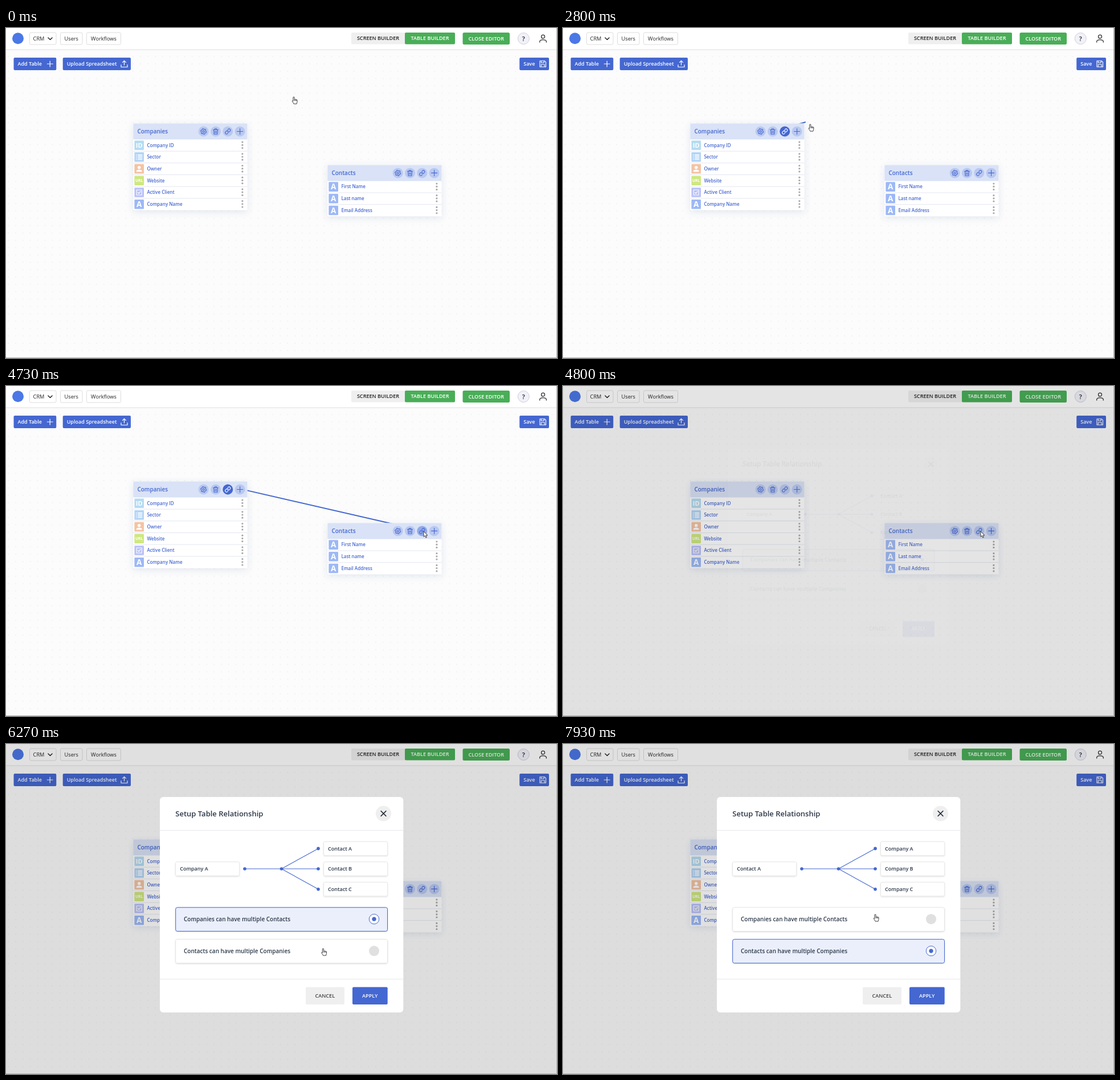
An HTML page for the animation above (8000 ms loop, 967 by 579 pixels).

```html
<!DOCTYPE html>
<html lang="en">
<head>
<meta charset="utf-8">
<title>Table builder</title>
<style>
html, body { margin: 0; width: 100%; height: 100%; overflow: hidden; background: #fcfcfc; }
svg { display: block; font-family: "Open Sans", "Noto Sans", sans-serif; font-weight: 600; }
.icon { fill: none; stroke-linecap: round; stroke-linejoin: round; }
</style>
</head>
<body>
<svg id="stage" width="967" height="579" viewBox="0 0 967 579"></svg>
<script>
const BLUE = '#4467d1', GREEN = '#49ae57', INK = '#2c3849';

// Drawing helpers
const text = (x, cy, size, str, fill, extra = '') =>
  `<text x="${x}" y="${cy + size * 0.357}" font-size="${size}" fill="${fill}" ${extra}>${str}</text>`;
const middle = 'text-anchor="middle"';
const box = (x, y, x2, y2, r, fill, extra = '') =>
  `<rect x="${x}" y="${y}" width="${x2 - x}" height="${y2 - y}" rx="${r}" fill="${fill}" ${extra}/>`;
const disc = (x, y, r, fill, extra = '') => `<circle cx="${x}" cy="${y}" r="${r}" fill="${fill}" ${extra}/>`;
const icon = (x, y, d, stroke, width = 1.1, scale = 1) =>
  `<path class="icon" transform="translate(${x} ${y}) scale(${scale})" d="${d}" stroke="${stroke}" stroke-width="${width / scale}"/>`;
const hline = (x, x2, y, color) => `<path d="M${x} ${y}H${x2}" stroke="${color}"/>`;

const gear = 'M' + Array.from({ length: 24 }, (_, i) => {
  const a = (i + 0.5) / 24 * 2 * Math.PI, r = i % 4 < 2 ? 5 : 3.9;
  return `${(r * Math.cos(a)).toFixed(2)} ${(r * Math.sin(a)).toFixed(2)}`;
}).join('L') + 'ZM1.7 0A1.7 1.7 0 1 1 -1.7 0A1.7 1.7 0 1 1 1.7 0';
const trash = 'M-4.3 -3H4.3M-1.6 -3V-4.7H1.6V-3M-3.4 -3L-2.9 4.8H2.9L3.4 -3M-1.1 -.7V2.6M1.1 -.7V2.6';
const chain = 'M-2 1a5 5 0 0 0 7.54.54l3-3a5 5 0 0 0-7.07-7.07l-1.72 1.71M2-1a5 5 0 0 0-7.54-.54l-3 3a5 5 0 0 0 7.07 7.07l1.71-1.71';
const plus = 'M-5 0H5M0 -5V5';

function header() {
  const tab = (x, x2, label) => box(x, 8, x2, 29, 2.5, '#fff', 'stroke="#dcdcdc"') +
    text(label === 'CRM' ? 57.5 : (x + x2) / 2, 18.6, 9.2, label, '#222', middle + ' font-weight="500"');
  return box(0, 0, 967, 37.5, 0, '#fff', 'filter="url(#soft)"') + hline(0, 967, 37.8, '#e6e6e8') +
    disc(21, 18.3, 10, '#4b78e6') +
    tab(41.5, 88, 'CRM') + icon(77.5, 18.8, 'M-3.6 -1.8L0 1.8L3.6 -1.8', '#222', 1.4) +
    tab(95.5, 134, 'Users') + tab(141.5, 201.5, 'Workflows') +
    box(606, 8, 702, 28.5, 2.5, '#efefef') + box(700, 8, 788, 28.5, 2, GREEN) +
    text(653, 18.2, 9.1, 'SCREEN BUILDER', '#222', middle) +
    text(744, 18.2, 9.1, 'TABLE BUILDER', '#fff', middle) +
    box(801.5, 8, 884, 29, 2.5, GREEN) + text(842.8, 18.4, 9.1, 'CLOSE EDITOR', '#fff', middle) +
    disc(908.3, 18.5, 10, '#f1f1fa', 'stroke="#cfcfdc"') + text(908.3, 18.6, 11, '?', '#222', middle) +
    icon(942.5, 18.5, 'M3 -3.3A3 3 0 1 1 -3 -3.3A3 3 0 1 1 3 -3.3M-5.8 6.5V5C-5.8 1.2 5.8 1.2 5.8 5V6.5', '#333', 1.3);
}

function toolbar() {
  const button = (x, x2, label) => box(x, 52, x2, 74, 2, BLUE) + text(x + 7, 63, 9, label, '#fff');
  return button(13.5, 88.3, 'Add Table') + icon(77.2, 63, plus, '#fff', 1.2) +
    button(99.7, 219, 'Upload Spreadsheet') +
    icon(207.5, 63, 'M-5.5 1.5V5.5H5.5V1.5M0 2V-5.5M-3 -2.6L0 -5.5L3 -2.6', '#fff', 1.2) +
    button(901.2, 953, 'Save') +
    icon(942.2, 63, 'M-5.3 -5.3H3L5.3 -3V5.3H-5.3ZM-3 -5V-2H2V-5M-3 5V1H3V5', '#fff', 1.1);
}

const letterTile = (s, size) => text(0, 0, size, s, '#fff', middle + ' font-weight="700"');
const tiles = {
  id: ['#b4dcf2', letterTile('ID', 11)],
  list: ['#b2d4f6', icon(0, 0, 'M-2 -4H5M-2 -1.3H5M-2 1.3H5M-2 4H5M-5 -4h.2M-5 -1.3h.2M-5 1.3h.2M-5 4h.2', '#fff', 1.5)],
  person: ['#f4c3a3', disc(0, -2.3, 2.7, '#fff') + '<path d="M-5 5.2V4C-5 .6 5 .6 5 4V5.2Z" fill="#fff"/>'],
  url: ['#cfe780', letterTile('URL', 6.8)],
  check: ['#b8c1f7', icon(0, 0, 'M-4.5 -4.5H4.5V4.5H-4.5ZM-2.2 0L-.5 1.8L2.4 -1.8', '#fff', 1.1)],
  letter: ['#9cb8f6', letterTile('A', 13.5)]
};

function card(x, y, title, rows, linkId) {
  const bottom = y + 28 + rows.length * 20.65;
  const tools = [gear, trash, chain, plus].map((d, i) => {
    const cx = x + 123.3 + i * 21.3, isLink = d === chain;
    return `<g ${isLink ? `id="${linkId}"` : ''}>` + disc(cx, y + 14, 9, '#b9c8f0') +
      icon(cx, y + 14, d, BLUE, 1.1, isLink ? 0.46 : 1) + '</g>';
  }).join('');
  const lines = rows.map(([kind, label], i) => {
    const cy = y + 38.2 + i * 20.7, [color, art] = tiles[kind];
    return box(x + 2, cy - 8.3, x + 18.6, cy + 8.3, 1, color) +
      `<g transform="translate(${x + 10.3} ${cy})">${art}</g>` +
      text(x + 24, cy, 8.05, label, BLUE) +
      [-5.2, 0, 5.2].map(d => disc(x + 191.5, cy + d - 0.4, 1.6, '#a9a9ab')).join('') +
      (i ? hline(x, x + 200, cy - 10.3, '#e3e6ef') : '');
  }).join('');
  return box(x, y, x + 200, bottom, 1, '#fff', 'filter="url(#lift)"') +
    box(x, y, x + 200, y + 28, 1, '#d9e2f6') +
    text(x + 7, y + 14.2, 10, title, BLUE) + tools + lines;
}

function dialog() {
  const node = (x, cy, id) => box(x, cy - 12.2, x + 112, cy + 12.2, 2.5, '#fff', 'stroke="#e6e6e8" filter="url(#edge)"') +
    text(x + 7.5, cy, 9, '', INK, `id="${id}"`);
  const ends = [183.4, 219, 254.7];
  const option = (y, label, id) => box(297.7, y, 669.5, y + 41.7, 3, '#fff', 'stroke="#e4e4e6" filter="url(#edge)"') +
    disc(646, y + 20.4, 9, '#e0e0e0') +
    `<g id="${id}">` + box(297.7, y, 669.5, y + 41.7, 3, '#ebeffb', `stroke="${BLUE}"`) +
    disc(646, y + 20.4, 8.7, '#fff', `stroke="${BLUE}"`) + disc(646, y + 20.4, 3.6, BLUE) + '</g>' +
    text(312, y + 20.8, 10, label, INK);
  return box(270, 93, 697.3, 471, 6, '#fff') +
    text(297.3, 122, 13, 'Setup Table Relationship', INK) +
    disc(662.5, 122, 13.6, '#efefef') + icon(662.5, 122, 'M-4.4 -4.4L4.4 4.4M4.4 -4.4L-4.4 4.4', '#222d3b', 1.5) +
    hline(270, 697.3, 151.5, '#e8e8ea') + hline(270, 697.3, 412.5, '#e8e8ea') +
    node(297.7, 219, 'one') + ends.map((y, i) => node(557.6, y, 'many' + i)).join('') +
    `<path d="M419 219H483.5${ends.map(y => `M483.5 219L548 ${y}`).join('')}" stroke="${BLUE}" stroke-width="1.1" fill="none"/>` +
    disc(419, 219, 2.8, BLUE) + disc(483.5, 219, 2.8, BLUE) + ends.map(y => disc(548, y, 2.8, BLUE)).join('') +
    option(286.8, 'Companies can have multiple Contacts', 'pickTop') +
    option(342.7, 'Contacts can have multiple Companies', 'pickBottom') +
    box(526, 426.5, 594, 457, 2, '#efefef') + text(559.8, 441.7, 9.1, 'CANCEL', '#444', middle) +
    box(608, 426.5, 669.7, 457, 2, BLUE) + text(638.7, 441.7, 9.1, 'APPLY', '#fff', middle);
}

const stage = document.getElementById('stage');
stage.innerHTML = `
<defs>
  <pattern id="grid" width="12.9" height="12.9" patternUnits="userSpaceOnUse" y="44">${disc(4, 6, 0.7, '#e3e3e5')}</pattern>
  <filter id="soft" x="-5%" y="-20%" width="110%" height="150%"><feDropShadow dx="0" dy="1" stdDeviation="1" flood-opacity=".06"/></filter>
  <filter id="lift" x="-15%" y="-20%" width="130%" height="145%"><feDropShadow dx="0" dy="3" stdDeviation="6" flood-color="#4a5f9a" flood-opacity=".14"/></filter>
  <filter id="edge" x="-5%" y="-15%" width="110%" height="140%"><feDropShadow dx="0" dy="1" stdDeviation=".9" flood-opacity=".14"/></filter>
</defs>
${box(0, 0, 967, 579, 0, '#fcfcfc')}${box(0, 38, 967, 579, 0, 'url(#grid)')}
<path id="wire" stroke="${BLUE}" stroke-width="2"/>
${header()}${toolbar()}
${card(223.4, 167.5, 'Companies', [['id', 'Company ID'], ['list', 'Sector'], ['person', 'Owner'],
  ['url', 'Website'], ['check', 'Active Client'], ['letter', 'Company Name']], 'linkFrom')}
${card(564.4, 240.4, 'Contacts', [['letter', 'First Name'], ['letter', 'Last name'], ['letter', 'Email Address']], 'linkTo')}
${box(0, 0, 966, 578, 0, '#000', 'id="shade"')}
<g id="dialog">${dialog()}</g>
<path d="M966.5 0V578.5H0" fill="none" stroke="#b4b4b6"/>
<g id="cursor" stroke="#2b2b30" stroke-width=".9" stroke-linejoin="round" fill="#fff">
  <path id="hand" d="M-2.6 1.4V-5a1.1 1.1 0 0 1 2.2 0V-1.6a.95.95 0 0 1 1.75.2a.95.95 0 0 1 1.7.3a.9.9 0 0 1 1.5.8V2.4C4.5 3.8 3.6 4.4 3.6 6.1H-1.5C-1.8 4.5-3.3 3.4-4.2 1.5C-4.6.4-3.4.1-2.6 1.4ZM-.4 -1.4V.8M1.35 -1.2V.9M3.05 -.9V1"/>
  <path id="arrow" d="M-3.5 -8V1.5L-1.3 -.4L.3 3.1L1.9 2.4L.4 -1H3.4Z"/>
</g>`;

const el = id => document.getElementById(id);
const show = (id, on) => el(id).setAttribute('visibility', on ? 'visible' : 'hidden');

// Times below count ticks, 15 per second
const TICK = 1000 / 15, LOOP = 8000;
const cursorPath = [
  [10, 506.5, 127], [13, 503, 122.5], [16, 474, 127], [20, 411, 154], [22, 389, 169], [23, 385, 173.5], [25, 389.5, 183],
  [38, 389.5, 183], [41, 408, 171], [44, 490, 183], [48, 657, 220], [50, 715, 237], [51, 722, 242.7],
  [54, 737, 265], [56, 739.5, 269], [59, 739.5, 269], [62, 736.5, 263], [85, 736.5, 263],
  [87, 719, 273], [91, 603, 340], [93, 562, 363], [94, 558, 365], [111, 558, 365],
  [113, 560, 360], [117, 553, 317], [119, 549.5, 305]
];

function along(path, n) {
  const i = path.findIndex(p => p[0] >= n);
  if (i < 1) return path[i < 0 ? path.length - 1 : 0].slice(1);
  const [a, b] = [path[i - 1], path[i]], k = (n - a[0]) / (b[0] - a[0]);
  return [a[1] + (b[1] - a[1]) * k, a[2] + (b[2] - a[2]) * k];
}

function paintLink(id, fill, stroke) {
  const [circle, glyph] = el(id).children;
  circle.setAttribute('fill', fill);
  glyph.setAttribute('stroke', stroke);
}

function draw(n) {
  const [x, y] = along(cursorPath, n);
  el('cursor').setAttribute('transform', `translate(${x} ${y})`);
  const isArrow = n >= 52 && n < 92;
  show('arrow', isArrow);
  show('hand', !isArrow);

  const linking = n >= 28 && n < 72;
  show('wire', linking);
  el('wire').setAttribute('d', `M390 175.6L${x - 9.5} ${y - 10}`);
  if (linking) paintLink('linkFrom', BLUE, '#fff');
  else paintLink('linkFrom', n >= 24 && n < 28 ? '#8fa8e6' : '#b9c8f0', BLUE);
  paintLink('linkTo', n >= 61 && n < 72 ? '#92a9e6' : '#b9c8f0', BLUE);

  const fade = [0, 0.05, 0.3, 0.6, 0.83, 0.95, 1][Math.max(0, Math.min(6, n - 71))];
  el('shade').setAttribute('opacity', n < 72 ? 0 : n < 73 ? 0.105 : 0.12);
  el('dialog').setAttribute('opacity', fade);
  el('dialog').setAttribute('transform', `translate(483.6 282) scale(${0.9 + 0.1 * fade}) translate(-483.6 -282)`);
  show('dialog', fade > 0);

  const swapped = n >= 103, mix = Math.max(0, Math.min(1, (n - 102) / 3));
  const [one, many] = swapped ? ['Contact', 'Company'] : ['Company', 'Contact'];
  el('one').textContent = one + ' A';
  ['A', 'B', 'C'].forEach((c, i) => el('many' + i).textContent = `${many} ${c}`);
  el('pickTop').setAttribute('opacity', 1 - mix);
  el('pickBottom').setAttribute('opacity', mix);
}

const start = performance.now();
function frame(now) {
  const t = Math.max(0, now - start) % LOOP;
  draw(Math.min(119, Math.floor((t + 4) / TICK)));
  requestAnimationFrame(frame);
}
draw(0);
requestAnimationFrame(frame);
</script>
</body>
</html>
```
